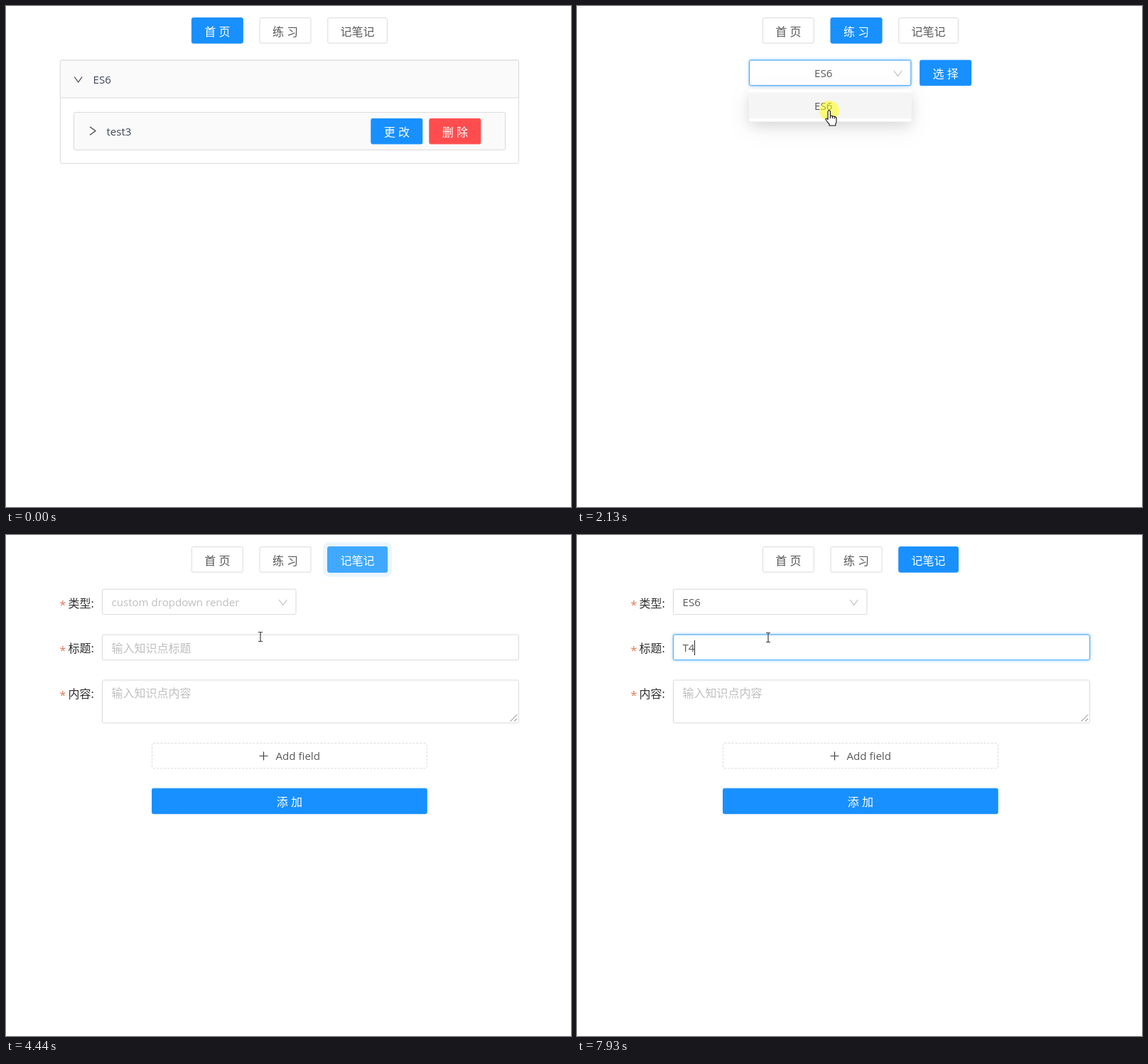
An HTML page for the animation above (8 s loop, 795 px wide and 704 px high).

```html
<!DOCTYPE html>
<html lang="zh-CN">
<head>
<meta charset="utf-8">
<title>笔记练习</title>
<style>
  html, body { margin: 0; width: 100%; height: 100%; overflow: hidden; background: #fff; }
  svg { display: block; }
  text { font: 16px "Open Sans", "Noto Sans CJK SC", "Noto Sans CJK JP", sans-serif; fill: #595959; white-space: pre; }
  .en { font-size: 15.1px; }
  .mid { font-size: 18.24px; }
  .big { font-size: 27.36px; }
  .gap { letter-spacing: 4.2px; }
  .hint { fill: #bfbfbf; }
  .label { fill: #303030; }
  .star { fill: #e07a58; }
  .slate { fill: #3d4757; }
  .box, .plain rect { fill: #fff; stroke: #d9d9d9; }
  .panel { fill: #fafafa; stroke: #d9d9d9; }
  .hover rect, .box.lit { fill: #fff; stroke: #40a9ff; }
  .box.focus { stroke: #40a9ff; filter: drop-shadow(0 0 2px rgba(24, 144, 255, .5)); }
  .hover text { fill: #40a9ff; }
  .primary rect { fill: #1890ff; stroke: #1890ff; }
  .light rect { fill: #40a9ff; stroke: #40a9ff; }
  .danger rect { fill: #ff4d4f; stroke: #ff4d4f; }
  .primary text, .light text, .danger text { fill: #fff; }
  .dashed { fill: #fff; stroke: #d9d9d9; stroke-dasharray: 3 2; }
  .card { fill: #fff; stroke: #91d5ff; }
  .pale { fill: #fff; stroke: #f0f0f0; }
  .line { fill: none; stroke: #404040; stroke-width: 1.2; }
  .line.soft { stroke: #bfbfbf; }
  .line.grip { stroke: #777; stroke-width: 1; }
  .wave { fill: none; stroke: #1890ff; }
  .drop { filter: drop-shadow(0 6px 9px rgba(0, 0, 0, .1)) drop-shadow(0 8px 16px rgba(0, 0, 0, .07)); transform-origin: 0 117px; }
  .paper { fill: #fff; }
  .item { fill: #f5f5f5; }
  .skeleton { fill: #f3f5f6; }
  .pointer { fill: #fff; stroke: #111; stroke-width: 1.1; stroke-linejoin: round; }
</style>
</head>
<body>
<svg id="stage" width="795" height="704" viewBox="0 0 795 704"></svg>
<script>
const LOOP = 8000, STEP = 76.9, FADE = 300;
const PRACTICE = 1000, PICKED = 2130, QUIZ = 2820, NOTES = 4130, TYPED = 7230;

// Shared layout: page edges, control height and the tops of the rows.
const LEFT = 75.9, WIDE = 646, TALL = 36.5, NAV = 16.2;
const ROW1 = 75.7, ROW2 = 139.6, ROW3 = 203.4;

// Anything with data-at="from,to,fade" is visible only in that span (ms).
const at = (from, to = LOOP + FADE, fade = 0) => `data-at="${from},${to},${fade}"`;
const text = (x, y, label, cls = '', when = '') => `<text x="${x}" y="${y}" class="${cls}" ${when}>${label}</text>`;
const slab = (x, y, w, h, cls, r = 0, when = '') =>
  `<rect x="${x}" y="${y}" width="${w}" height="${h}" rx="${r}" class="${cls}" ${when}/>`;
// Bordered box: the 1px stroke stays inside the given edges.
const rect = (x, y, w, h, cls, when = '', r = 2) => slab(x + 0.5, y + 0.5, w - 1, h - 1, cls, r, when);
const path = (d, cls = 'line', when = '') => `<path d="${d}" class="${cls}" ${when}/>`;
const group = (when, ...parts) => `<g ${when}>${parts.join('')}</g>`;

function button(x, y, w, label, kind, when = '') {
  const pair = label.length === 2;
  const tx = x + (w - (pair ? 36.2 : 16 * label.length)) / 2;
  return `<g class="${kind}" ${when}>` + rect(x, y, w, TALL, '') +
    text(tx, y + TALL / 2 + 7.2, label, pair ? 'gap' : '') + '</g>';
}

const wave = (x, y, w, start) => slab(x, y, w, TALL, 'wave', 2, `data-start="${start}"`);
const down = (x, y, cls, when) => path(`M${x - 5.5} ${y - 4}l5.5 7.5 5.5-7.5`, cls, when);
const up = (x, y, cls, when) => path(`M${x - 5.5} ${y + 4}l5.5-7.5 5.5 7.5`, cls, when);
const plus = (x, y) => path(`M${x - 6} ${y}h12M${x} ${y - 6}v12`);
const label = (y, name) => text(75.5, y + 2.5, '*', 'star') + text(87.5, y, name + ':', 'label');

function tab(x, w, name, { hover, active, light }) {
  const draw = (kind, when) => button(x, NAV, w, name, kind, when);
  return draw('plain') + (hover ? draw('hover', at(...hover, FADE)) : '') +
    draw('primary', at(...active, FADE)) + (light ? draw('light', at(...light, FADE)) : '');
}

const nav = wave(356.5, NAV, 73, PRACTICE) + wave(452.3, NAV, 84.6, NOTES) +
  tab(260.9, 72.9, '首页', { active: [-FADE, PRACTICE] }) +
  tab(356.5, 73, '练习', { hover: [860, PRACTICE], active: [PRACTICE, NOTES], light: [PRACTICE, 1590] }) +
  tab(452.3, 84.6, '记笔记', { hover: [3060, NOTES], active: [NOTES, LOOP + FADE], light: [NOTES, 4950] });

const home = group(at(0, PRACTICE),
  rect(LEFT, ROW1, WIDE, 146, 'box'), rect(LEFT, ROW1, WIDE, 53.8, 'panel'),
  down(101.7, 103.5, 'line'), text(122.5, 109.3, 'ES6', 'en slate'),
  rect(95, 148.9, 608, 53.8, 'panel'),
  path('M118 169.8l8 5.7-8 5.7'), text(141.5, 182, 'test3', 'en slate'),
  button(513.3, 157.8, 73, '更改', 'primary'), button(595.3, 157.8, 73, '删除', 'danger'));

const bars = [[104, 644], [104, 294.5, 304, 668], [104, 244, 253, 694],
  [104, 419, 428.5, 644], [104, 195, 204.5, 270, 279, 668]];
const skeleton = bars.map((row, i) => row.map((x, j) =>
  j % 2 ? '' : slab(x, 401.2 + 25.08 * i, row[j + 1] - x, 16, 'skeleton', 2)).join('')).join('');

const quiz = group(at(QUIZ, NOTES),
  text(241, 165, '当前第1道，共1道', 'mid'),
  button(393.9, ROW2, 84.6, '下一道', 'primary'), button(484.1, ROW2, 73, '换题', 'danger'),
  rect(LEFT, ROW3, WIDE, 91.2, 'card', '', 6),
  text(235, 259.5, '点击下面的按钮查看知识点', 'big'),
  text(332, 344, '查看答案', 'mid'),
  '<rect x="416" y="325" width="50" height="25" rx="12.5" fill="#bfbfbf"/>',
  '<circle cx="428.6" cy="337.5" r="10.4" fill="#fff"/>',
  rect(LEFT, 368, WIDE, 182.8, 'pale'), skeleton);

const practice = group(at(PRACTICE, NOTES),
  rect(242, ROW1, 228.3, TALL, 'box'),
  rect(242, ROW1, 228.3, TALL, 'box lit', at(1430, 1650)),
  rect(242, ROW1, 228.3, TALL, 'box focus', at(1590, 2790, FADE)),
  text(298, 100.7, '选择题目类型', 'hint', at(0, PICKED)),
  text(334, 100.2, 'ES6', 'en', at(PICKED)),
  down(451.5, 95, 'line soft', at(0, 1650)), up(451.5, 95, 'line soft', at(1650, PICKED)),
  down(451.5, 95, 'line soft', at(PICKED)),
  wave(482.1, ROW1, 73, QUIZ),
  button(482.1, ROW1, 73, '选择', 'primary'),
  button(482.1, ROW1, 73, '选择', 'light', at(2460, NOTES, 200)),
  quiz,
  group(`class="drop" ${at(1640, PICKED, 200)}`,
    slab(242, 117, 228.3, 45.5, 'paper', 2), slab(242, 121.5, 228.3, 36.5, 'item'),
    text(334, 146, 'ES6', 'en')));

const notes = group(at(NOTES),
  label(101.5, '类型'), label(165, '标题'), label(228.7, '内容'),
  rect(135, ROW1, 273.5, TALL, 'box'),
  rect(135, ROW1, 273.5, TALL, 'box lit', at(4750, 4930)),
  rect(135, ROW1, 273.5, TALL, 'box focus', at(4930, 5830, FADE)),
  text(148.5, 100.2, 'custom dropdown render', 'en hint', at(0, 5830)),
  text(148.5, 100.2, 'ES6', 'en', at(5830)),
  down(389.7, 95, 'line soft', at(0, 4980)), up(389.7, 95, 'line soft', at(4980, 5830)),
  down(389.7, 95, 'line soft', at(5830)),
  rect(135, ROW2, 586.9, TALL, 'box'),
  rect(135, ROW2, 586.9, TALL, 'box focus', at(6080, LOOP + FADE, 200)),
  text(148.5, 165, '输入知识点标题', 'hint', at(0, TYPED)),
  text(148.5, 164.3, 'T', 'en', at(TYPED)), text(156.8, 164.3, '4', 'en', at(7540)),
  path('M149.5 148v21', 'line', at(6150, 6680)),
  path('M157.5 148v21', 'line', at(TYPED, 7540)), path('M165.5 148v21', 'line', at(7540)),
  rect(135, ROW3, 586.9, 61.2, 'box'), path('M709.5 262l9.5-9.5M715 262l4-4', 'line grip'),
  text(148.5, 228, '输入知识点内容', 'hint'),
  rect(205, 291.9, 387.7, TALL, 'dashed'), plus(362.5, 310.5), text(379.5, 316.3, 'Add field', 'en'),
  button(205, 355.7, 387.7, '添加', 'primary'),
  group(`class="drop" ${at(4980, 5830, 200)}`,
    slab(135, 117, 273.5, 116.5, 'paper', 2), slab(135, 121.5, 273.5, 36.5, 'item'),
    text(148.5, 146, 'ES6', 'en'), slab(135, 162, 273.5, 1, 'item'),
    rect(144, 177, 152.5, 43, 'box'), plus(313, 199.5), text(325, 205, 'Add item', 'en')));

const cursor = '<g id="cursor"><circle id="click" r="14" fill="#ff0" opacity=".5"/>' +
  path('M0 0V15l3.5-3.2 2.4 5 2.3-1-2.3-5H10.8z', 'pointer arrow') +
  '<g class="pointer hand"><path d="M-2 1.5a1.7 1.7 0 0 1 3.4 0V7l6 1.2q2.6.6 2.6 3.2v3.6q0 2-1.2 3.6V21H0v-2q-2-2-4.6-5.8-1-1.8.4-2.2 1.2-.2 2.2 1.6z"/>' +
  '<path d="M1.4 7v4M4.4 7.6V11M7.2 8.2v3" fill="none"/></g>' +
  path('M-3-6.5h2q1 0 1 1 0-1 1-1h2M0-5.5v11M-3 6.5h2q1 0 1-1 0 1 1 1h2', 'line beam') + '</g>';

const stage = document.getElementById('stage');
stage.innerHTML = nav + home + practice + notes + cursor;

// Pointer stops: time, x, y.
const route = [[210, 671, 535], [655, 377, 10], [815, 377, 10], [890, 380, 32], [1110, 380, 32],
  [1430, 366, 82], [1670, 366, 82], [1960, 355, 147], [2130, 355, 147], [2430, 526, 128],
  [2580, 499, 94], [2890, 499, 94], [3200, 501, 23], [3360, 501, 23], [3580, 499, 33],
  [4200, 499, 33], [4425, 358, 143], [4500, 358, 143], [4800, 275, 97], [5000, 275, 97],
  [5340, 254, 147], [5830, 254, 147], [6100, 267, 144], [7850, 267, 144], [7880, 269, 144]];
const clicks = [910, 1500, 2060, 2740, 3965, 4900, 5680, 6150];
const hands = [[880, 1190], [1880, 2210], [2560, 2990], [3110, 4270], [5150, 5900]];
const beams = [[4400, 4590], [5960, LOOP]];

const clamp = v => Math.min(1, Math.max(0, v));
const within = (t, spans) => spans.some(([a, b]) => t >= a && t < b);
const find = s => stage.querySelector(s);
const timed = [...stage.querySelectorAll('[data-at]')].map(el => {
  const [from, to, fade] = el.dataset.at.split(',').map(Number);
  return { el, from, to, fade, drop: el.classList.contains('drop') };
});
const waves = [...stage.querySelectorAll('.wave')];
const pointer = find('#cursor'), click = find('#click');
const shapes = { arrow: find('.arrow'), hand: find('.hand'), beam: find('.beam') };

function position(t) {
  const i = route.findIndex(p => p[0] > t);
  if (i < 0) return route.at(-1).slice(1);
  if (i === 0) return route[0].slice(1);
  const [t0, x0, y0] = route[i - 1], [t1, x1, y1] = route[i];
  const p = (t - t0) / (t1 - t0), e = p * p * (3 - 2 * p);
  return [x0 + (x1 - x0) * e, y0 + (y1 - y0) * e];
}

function render(t) {
  const q = Math.max(0, 200 + Math.floor((t - 200) / STEP) * STEP);
  for (const { el, from, to, fade, drop } of timed) {
    const level = fade ? clamp((q - from) / fade) - clamp((q - to) / fade) : +(t >= from && t < to);
    el.style.display = level > 0 ? '' : 'none';
    el.style.opacity = level;
    if (drop) el.style.transform = `scaleY(${0.8 + 0.2 * level})`;
  }
  for (const el of waves) {
    const age = q - el.dataset.start;
    el.style.strokeWidth = 12 * (1 - (1 - clamp(age / 400)) ** 5);
    el.style.opacity = age > 0 ? 0.2 * (1 - clamp(age / 2000)) ** 5 : 0;
  }
  const [x, y] = position(q);
  const shape = within(t, hands) ? 'hand' : within(t, beams) ? 'beam' : 'arrow';
  pointer.style.display = t < route[0][0] ? 'none' : '';
  pointer.setAttribute('transform', `translate(${Math.round(x)} ${Math.round(y)})`);
  for (const name in shapes) shapes[name].style.display = name === shape ? '' : 'none';
  click.style.display = clicks.some(c => t >= c && t < c + 155) ? '' : 'none';
}

function tick(now) {
  render(now % LOOP);
  requestAnimationFrame(tick);
}
render(0);
requestAnimationFrame(tick);
</script>
</body>
</html>
```
